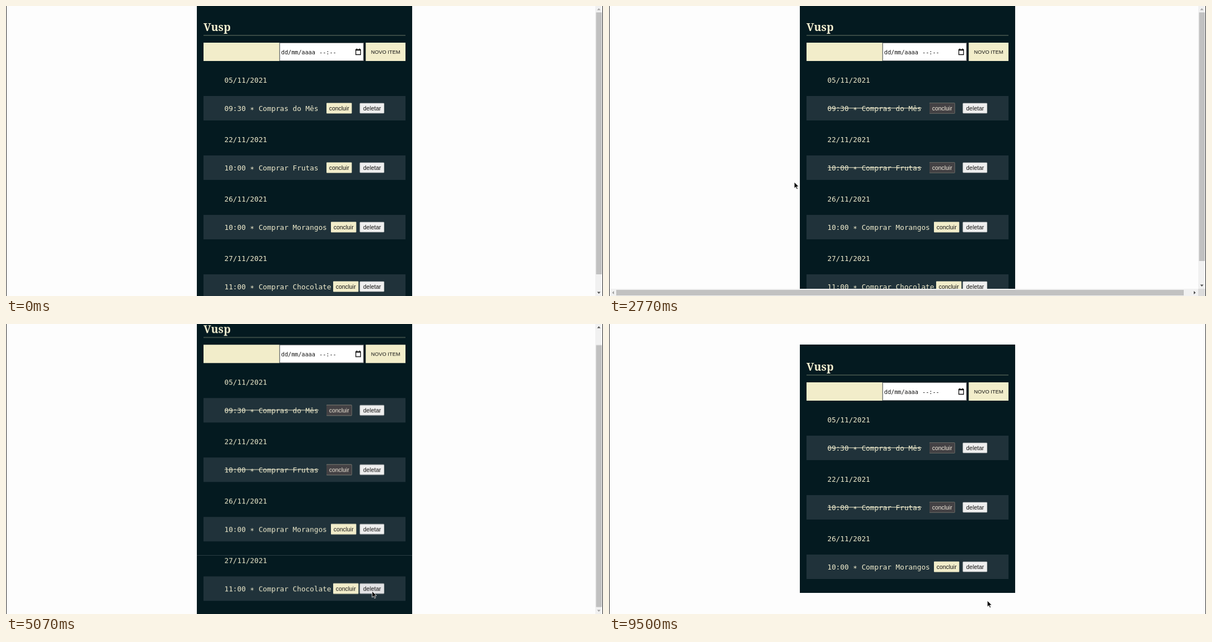
Recreate the animation shown at these times as an HTML page. Size 1073 by 522 pixels, loop 9.53 s.

```html
<!DOCTYPE html>
<html lang="pt-BR">
<head>
<meta charset="utf-8">
<title>Lista de tarefas</title>
<style>
  html, body { margin: 0; width: 100%; height: 100%; overflow: hidden; background: #fdfdfd; }
  svg { display: block; width: 1073px; height: 522px; }
  svg * { animation: 9530ms step-end infinite; }
  text { white-space: pre; }
  .title { font: bold 19.5px "Noto Serif", serif; fill: #f4efcf; }
  .mono { font: 12.75px "DejaVu Sans Mono", monospace; fill: #f0eccd; }
  .field { font: 10.2px "DejaVu Sans Mono", monospace; fill: #111; }
  .btn { font: 10.45px "Liberation Sans", Arial, sans-serif; fill: #111; text-anchor: middle; }
  .add { font-size: 9.4px; }
  .panel { fill: #041a20; }
  .card { fill: #20323a; }
  .cream { fill: #f2edca; }
  .track { fill: #f1f1f1; }
  .thumb { fill: #c1c1c1; }
  .dark { fill: #505050; }
  .light { fill: #a3a3a3; }
  .cursor { fill: #080808; stroke: #fff; stroke-width: .8; }

  .done0 { animation-name: firstDone; }
  .done1 { animation-name: secondDone; }
  .row3, .vbar { animation-name: removed; }
  .row3 .delete { animation-name: hover; }
  .page { animation-name: scroll; }
  .vthumb { animation-name: thumb; }
  .up { animation-name: upArrow; }
  .down { animation-name: downArrow; }
  .hbar { animation-name: hbar; }
  .cursor { animation-name: pointer; animation-timing-function: ease-in-out; }

  @keyframes firstDone { 0% { opacity: 0 } 7.87%, 100% { opacity: 1 } }
  @keyframes secondDone { 0% { opacity: 0 } 17.3%, 100% { opacity: 1 } }
  @keyframes removed { 0% { opacity: 1 } 61.9%, 100% { opacity: 0 } }
  @keyframes hover { 0% { fill: #efefef } 51.2%, 100% { fill: #e3e3e5 } }
  @keyframes hbar { 0% { opacity: 0 } 7.87% { opacity: 1 } 35.7%, 100% { opacity: 0 } }
  @keyframes scroll {
    0% { transform: none }
    43.3% { transform: translateY(0); animation-timing-function: ease-in-out }
    46.8% { transform: translateY(-28.7px) }
    61.9%, 100% { transform: translateY(39px) }
  }
  @keyframes thumb {
    0% { transform: none }
    43.3% { transform: translateY(0); animation-timing-function: ease-in-out }
    46.8%, 100% { transform: translateY(26.5px) }
  }
  @keyframes upArrow { 0% { fill: #a3a3a3 } 43.5%, 100% { fill: #505050 } }
  @keyframes downArrow { 0% { fill: #505050 } 46.8%, 100% { fill: #a3a3a3 } }
  @keyframes pointer {
    0%, 2.62% { transform: translate(640px, 530px) }
    6.3%, 10.5% { transform: translate(602px, 186px) }
    13.956% { transform: translate(612px, 278px) }
    15.74%, 19.9% { transform: translate(604px, 291px) }
    26.2% { transform: translate(338px, 326px) }
    29.07% { transform: translate(333px, 317px) }
    39.5%, 43.757% { transform: translate(341px, 222px) }
    51.4%, 62.8% { transform: translate(658px, 481px) }
    70.3%, 74.8% { transform: translate(258px, 294px) }
    82.9%, 100% { transform: translate(680px, 498px) }
  }
</style>
</head>
<body>
<svg viewBox="0 0 1073 522">
  <rect width="1073" height="522" fill="#fdfdfd"/>

  <g class="page">
    <rect class="panel" x="343" y="-2" width="387" height="447"/>
    <text class="title" x="355" y="45">Vusp</text>
    <rect x="355" y="52.4" width="363" height="1" fill="#6d7867"/>
    <rect class="cream" x="355" y="66" width="136.5" height="33"/>
    <rect x="492" y="66.5" width="150.5" height="32" fill="#fff" stroke="#767676"/>
    <text class="field" x="494.5" y="86.5">dd/mm/aaaa</text>
    <text class="field" x="563" y="86.5">--:--</text>
    <path d="M628.7 78.5h8.6v9h-8.6zM628.7 79.5h8.6M630.5 76.5v2M635.5 76.5v2" fill="none" stroke="#111" stroke-width="1.3"/>
    <rect class="cream" x="646.5" y="66" width="71.5" height="33"/>
    <text class="btn add" x="682.2" y="86">NOVO ITEM</text>
    <g id="rows"></g>
  </g>

  <g class="vbar">
    <rect class="track" x="1059" width="13" height="522"/>
    <rect class="thumb vthumb" x="1060.5" y="11.5" width="10.5" height="471.5"/>
    <path class="up" d="M1062.5 7.5h6l-3-3.5z"/>
    <path class="down" d="M1062.5 514.5h6l-3 3.5z"/>
  </g>

  <g class="hbar">
    <rect class="track" x="1059" y="459" width="13" height="50"/>
    <path class="dark" d="M1062.5 501.5h6l-3 3.5z"/>
    <rect class="track" x="1" y="509" width="1058" height="13"/>
    <rect class="thumb" x="13" y="511" width="1020" height="10"/>
    <path class="light" d="M9 513v6l-3.5-3z"/>
    <path class="dark" d="M1051 513v6l3.5-3z"/>
    <rect x="1059" y="509" width="13" height="13" fill="#dcdcdc"/>
  </g>

  <path d="M.5 0v522M1072.5 0v522" stroke="#2a2a2a"/>
  <path class="cursor" d="M0 0v11.2l2.6-2.4 1.9 4 1.9-.9-1.9-3.8h3.6z"/>
</svg>
<script>
  const tasks = [
    ["05/11/2021", "09:30 * Compras do Mês", 576],
    ["22/11/2021", "10:00 * Comprar Frutas", 576],
    ["26/11/2021", "10:00 * Comprar Morangos", 584],
    ["27/11/2021", "11:00 * Comprar Chocolate", 588],
  ];

  const concludeButton = (x, fill, color) => `
    <rect x="${x}" y="174.5" width="45.5" height="19" rx="1" fill="${fill}"/>
    <text class="btn" x="${x + 22.7}" y="187.8" style="fill:${color}">concluir</text>`;

  // Lowers the asterisk to the middle of the line.
  const centerStar = label =>
    label.replace("*", '<tspan dy="2.5">*</tspan><tspan dy="-2.5">') + "</tspan>";

  const row = ([date, label, x], i) => `
    <g class="row${i}"><g transform="translate(0 ${107 * i})">
      ${i === 3 ? '<rect class="panel" x="343" y="123.5" width="387" height="107.5"/>' : ""}
      <text class="mono" x="392.5" y="138.3">${date}</text>
      <rect class="card" x="355" y="162" width="363" height="44"/>
      <text class="mono" x="392.5" y="188.5">${centerStar(label)}</text>
      ${concludeButton(x, "#f2edca", "#111")}
      <rect class="delete" x="636" y="175" width="43.5" height="18" rx="1" fill="#efefef" stroke="#a9adae" stroke-width=".8"/>
      <text class="btn" x="658" y="187.8">deletar</text>
      ${i < 2 ? `<g class="done${i}">
        <rect x="393" y="183.3" width="${label.length * 7.68}" height="1" fill="#f0eccd"/>
        ${concludeButton(x, "#434144", "#f4ecdd")}
      </g>` : ""}
    </g></g>`;

  document.getElementById("rows").innerHTML = tasks.map(row).join("");
</script>
</body>
</html>
```
